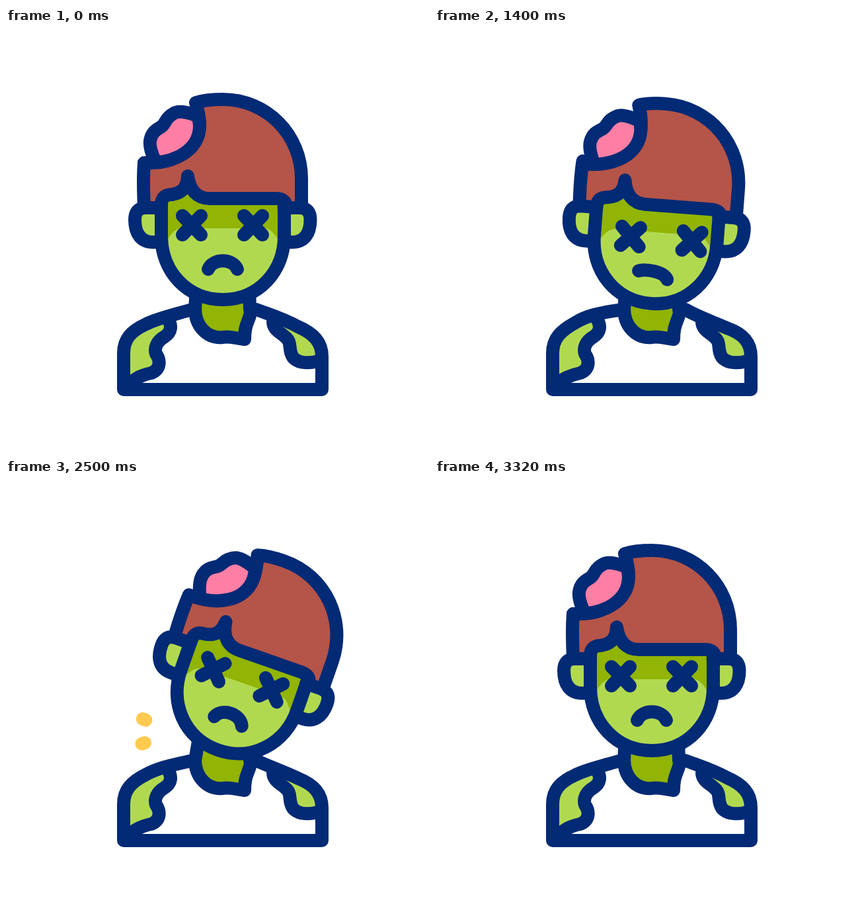
These frames come from a looping animation (640 px wide and 640 px high, 3600 ms). An HTML page:

```html
<!DOCTYPE html>
<html lang="en">
<head>
<meta charset="utf-8">
<title>Stiff-necked zombie</title>
<style>
  html, body { margin: 0; width: 100%; height: 100%; overflow: hidden; background: #fff; }
  svg { display: block; width: 100vw; height: 100vh; }
  .line { fill: none; stroke: #032a75; stroke-width: 20; stroke-linecap: round; stroke-linejoin: round; }
  .skin { fill: #b1d950; }
  .shade { fill: #91b405; }
  .hair { fill: #b55448; }
  .brain { fill: #ff7ea4; }
  .spark { stroke: #ffca4f; }
</style>
</head>
<body>
<svg viewBox="0 0 640 640">
  <path id="neck" class="shade"/>
  <path id="neckLine" class="line"/>
  <path id="leftArm" class="skin"/>
  <path id="rightArm" class="skin"/>
  <path id="leftTear" class="line"/>
  <path id="rightTear" class="line"/>
  <path id="torso" class="line"/>
  <path class="line" d="M286 424C286 452 305 470 328 468C338 466 345 469 361 471C361 450 366 446 369 435C371 429 370 425 369 420"/>
  <path id="sparks" class="line spark"/>
  <g id="head">
    <path class="skin" d="M235 258V315C235 368 274 411 328 411C382 411 421 368 421 315V258Z"/>
    <path class="shade" d="M235 248H421V338Q406 304 392 303H264Q250 304 235 338Z"/>
    <path class="hair" d="M209 204C255 206 293 185 293 148C293 135 290 122 287 113C300 109 314 108 328 108C395 108 447 162 447 228V270H424C424 263 420 258 408 258H308C290 258 278 246 275 224C274 242 266 250 250 252Q235 253 235 270H209Z"/>
    <g id="ear">
      <path class="skin" d="M228 272H210Q195 273 195 290C195 312 205 324 222 324H228Z"/>
      <path class="line" d="M235 272H210Q195 273 195 290C195 312 205 324 222 324H228"/>
    </g>
    <use href="#ear" transform="translate(655.5) scale(-1 1)"/>
    <path class="line" d="M235 268V315C235 368 274 411 328 411C382 411 421 368 421 315V268"/>
    <g id="front">
      <path class="line" d="M235 268C235 254 244 252 250 252C266 250 274 242 275 224C278 246 290 258 308 258H408Q424 258 424 271"/>
      <path class="brain" d="M224 198C219 186 217 178 218 171C220 158 227 154 234 150C241 146 240 140 247 134C255 127 260 126 268 127C276 128 282 130 290 133L293 148C293 178 265 202 226 204Z"/>
      <path class="line" d="M209 204C255 206 293 185 293 148Q293 141 290 133C282 130 276 128 268 127C260 126 255 127 247 134C240 140 241 146 234 150C227 154 220 158 218 171C217 178 219 186 224 198"/>
    </g>
    <path class="line" d="M209 270Q207 230 209 204M293 148C293 135 290 122 287 113C300 109 314 108 328 108C395 108 447 162 447 228V270"/>
    <path id="eyes" class="line" d="M267 284l28 29m0-29l-28 29M360 284l28 29m0-29l-28 29"/>
    <path id="mouth" class="line"/>
  </g>
</svg>
<script>
const LOOP = 3600, STEP = 20;
const el = id => document.getElementById(id);
const draw = (id, d) => el(id).setAttribute('d', d);
const move = (id, x, y) => el(id).setAttribute('transform', `translate(${x} ${y})`);

const progress = (t, from, to) => Math.min(1, Math.max(0, (t - from) / (to - from)));
const sway = (t, from, to) => (1 - Math.cos(Math.PI * progress(t, from, to))) / 2;
const settle = (t, from, to) => 1 - (1 - progress(t, from, to)) ** 3.3;

function drawBody(angle, lean) {
  const nl = 288 + angle * .2, nr = 368 + angle * .25;
  draw('neck', `M${nl} 375L286 425C286 452 305 470 328 468L361 471Q362 448 369 432L${nr} 390Z`);
  draw('neckLine', `M${nl} 392L286 426M${nr} 392L369 426`);

  // The shoulders tip in opposite directions.
  const tip = 5 * Math.tanh(lean / 5);
  const left = `V492C178 470 190 458 212 ${448 + tip / 2}C230 ${439 + tip} 250 ${435 + tip} 277 427`;
  const right = `M379 426C400 ${434 - tip} 420 ${440 - tip} 442 ${452 - tip / 2}C465 462 478 475 478 497`;
  draw('torso', `M178 547${left}${right}V547H178`);

  const tearLeft = `C251 450 251 460 240 467C228 474 224 484 227 493C234 503 234 516 220 522C205 525 195 530 ${184 + lean} 542`;
  draw('leftTear', 'M245 440' + tearLeft);
  draw('leftArm', `M178 545V492C178 470 190 458 212 ${448 + tip / 2}C225 ${442 + tip} 235 ${440 + tip} 245 440${tearLeft}Z`);

  const lift = Math.max(tip, 0);
  const tearRight = `M404 444C404 456 414 460 422 467C434 476 426 ${486 - lift} 434 ${498 - lift}C442 ${508 - lift} 460 ${508 - lift} 476 ${503 - lift}`;
  draw('rightTear', tearRight);
  draw('rightArm', `${tearRight}C478 475 465 462 442 ${452 - tip / 2}L404 ${437 - tip}Z`);
}

function drawHead(angle, look) {
  el('head').setAttribute('transform',
    `translate(${-angle * .1} ${6 * look}) rotate(${angle} 328 395)`);
  move('front', 0, 4 * look);
  move('eyes', 9 * look, 14 * look);
  const bend = 348 + 12 * look;
  draw('mouth', `M306 ${365 - 2 * look}C313 ${bend} 343 ${bend} 350 ${365 + 8 * look}`);
}

// Two dashes fly outward, the tail catching up with the tip.
function drawSparks(t) {
  const tip = 38 * progress(t, 2440, 2580), tail = 38 * progress(t, 2440, 2640);
  const dash = (x, y, dx, dy) =>
    `M${x + dx * tail} ${y + dy * tail}L${x + dx * tip} ${y + dy * tip}`;
  draw('sparks', tip > tail ? dash(222, 369, -.93, -.37) + dash(221, 396, -.96, .28) : '');
}

function render(time) {
  const t = Math.floor((time % LOOP) / STEP) * STEP;
  const nod = sway(t, 220, 740);
  const swing = sway(t, 1340, 2060);
  const snap = sway(t, 2060, 2640);
  const rest = settle(t, 2640, 3320);
  const angle = 5.2 * nod - 47.2 * swing + 71 * snap - 29 * rest;
  const lean = -6 * nod + 22 * swing ** 2 - 21 * snap + 5 * rest;
  drawBody(angle, lean);
  drawHead(angle, nod - swing);
  drawSparks(t);
}

const start = performance.now();
function tick() {
  render(performance.now() - start);
  requestAnimationFrame(tick);
}
tick();
</script>
</body>
</html>
```
